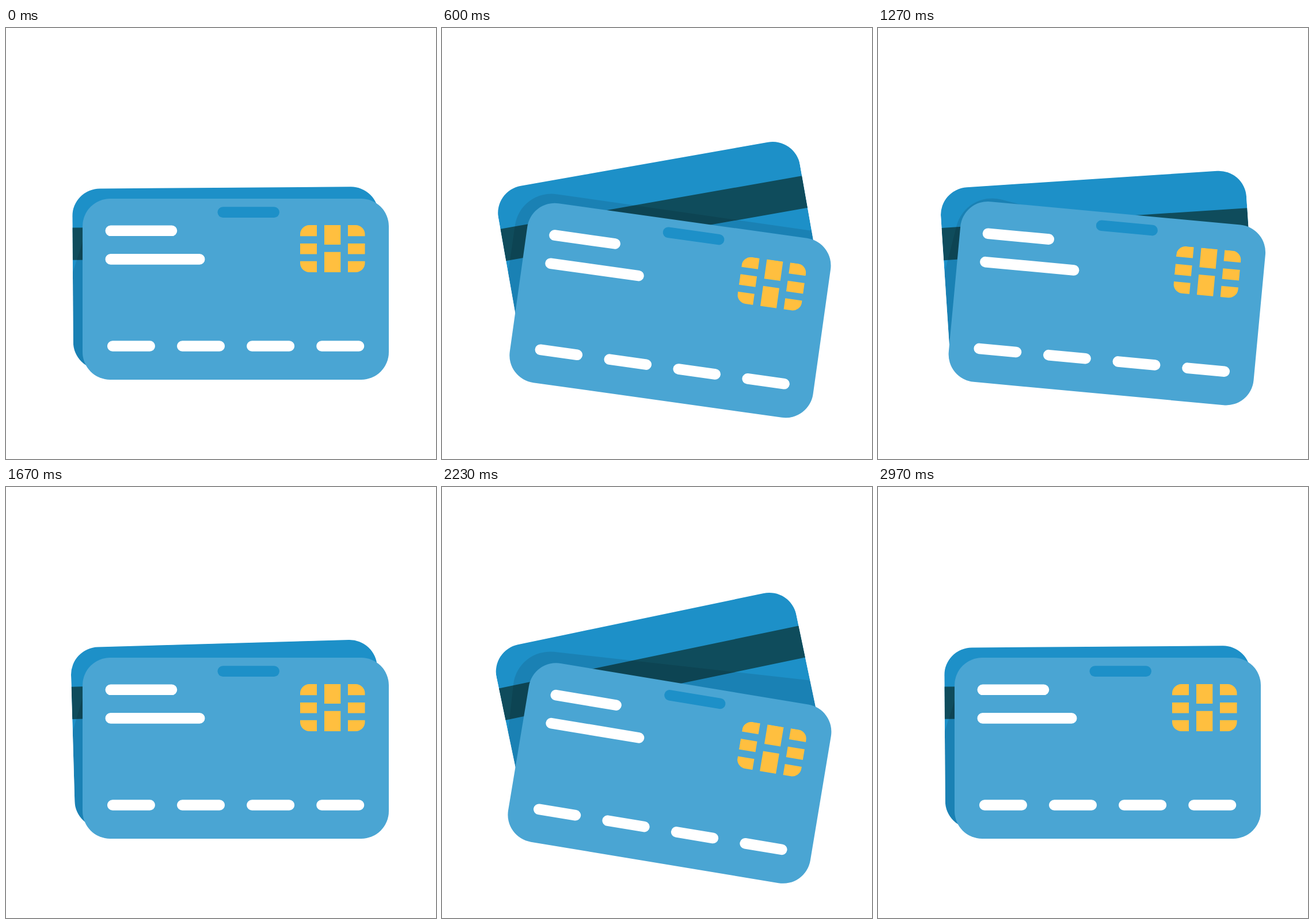
Animation, 747 px wide and 750 px high, one loop 3.01 s. Source, as an HTML page:

```html
<!DOCTYPE html>
<html lang="en">
<head>
<meta charset="utf-8">
<title>Bank cards</title>
<style>
  html, body { margin: 0; width: 100%; height: 100%; overflow: hidden; background: #fff; }
  svg { display: block; width: 747px; height: 750px; }
</style>
</head>
<body>
<svg viewBox="0 0 747 750">
  <clipPath id="backShape"><rect x="116" y="279.7" width="532" height="315" rx="48"/></clipPath>
  <clipPath id="chipShape"><rect x="511" y="343" width="112.5" height="82" rx="16"/></clipPath>

  <g id="back">
    <g clip-path="url(#backShape)">
      <rect x="116" y="279" width="532" height="317" fill="#1d90c8"/>
      <rect x="116" y="347.5" width="532" height="56.3" fill="#0f4c5c"/>
      <rect x="-64" y="-64" width="800" height="600" rx="64" fill-opacity=".1"
            transform="translate(202.9 365.6) rotate(18.2)"/>
    </g>
  </g>

  <g id="front">
    <rect x="133" y="297" width="532" height="315" rx="48" fill="#4aa5d3"/>
    <g stroke="#fff" stroke-width="18.6" stroke-linecap="round">
      <path d="M376.8 320.6H465.7" stroke="#1d90c8"/>
      <path d="M181.8 352.8H288M181.8 402.4H336.2"/>
      <path d="M185.2 553.5h64.5m56.6 0h64.5m56.6 0h64.5m56.6 0h64.5"/>
    </g>
    <path clip-path="url(#chipShape)" fill="#ffbf3f"
          d="M511 343h29v19.2h-29zm0 32h29v18.6h-29zm0 63h29v-32.2h-29z
             M594 343h30v19.2h-30zm0 32h30v18.6h-30zm0 63h30v-32.2h-30z
             M553 343h28.3v34h-28.3zm0 46.7h28.3v36h-28.3z"/>
  </g>
</svg>
<script>
  const LOOP = 3010, FPS = 30, LAST = 89;
  // [frame, degrees]
  const frontKeys = [[0, 0], [25, 11.1], [50, 0], [70, 11.1], [89, 0]];
  const backKeys = [[0, -0.4], [25, -12.3], [45, -0.4], [70, -12.3], [87, -0.4], [89, -0.4]];
  const linear = p => p;
  const smooth = p => p * p * (3 - 2 * p);
  const front = document.getElementById('front');
  const back = document.getElementById('back');

  function angleAt(keys, frame, ease) {
    const i = keys.findIndex(k => k[0] >= frame);
    if (i === 0) return keys[0][1];
    const [f0, a0] = keys[i - 1], [f1, a1] = keys[i];
    return a0 + (a1 - a0) * ease((frame - f0) / (f1 - f0));
  }

  function draw() {
    const t = performance.now() % LOOP;
    // frames start on 10 ms ticks
    const frame = Math.min(LAST, Math.floor((t + 5) * FPS / 1000));
    front.setAttribute('transform', `rotate(${angleAt(frontKeys, frame, linear)} 133 454.5)`);
    back.setAttribute('transform', `rotate(${angleAt(backKeys, frame, smooth)} 122 432)`);
    requestAnimationFrame(draw);
  }
  draw();
</script>
</body>
</html>
```
